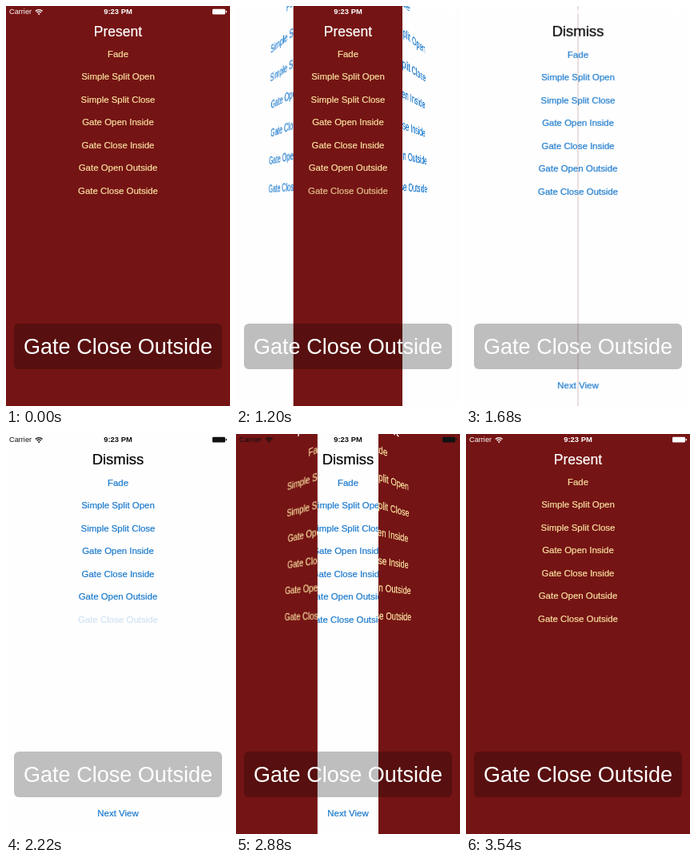
Animation, 280 px wide and 500 px high, one loop 3600 ms. Source, as an HTML page:

```html
<!DOCTYPE html>
<html lang="en">
<head>
<meta charset="utf-8">
<title>Gate transitions</title>
<style>
  html, body { margin: 0; width: 100%; height: 100%; overflow: hidden; }
  body { font: 11.45px/20px "Liberation Sans", Arial, sans-serif; }
  #stage { position: relative; width: 280px; height: 500px; overflow: hidden; }
  .page, .door { position: absolute; top: 0; left: 0; height: 500px; overflow: hidden; }
  .page { width: 280px; }
  .door { width: 140px; }
  .door.right { left: 140px; }
  .right .page { left: -140px; }
  .page div {
    position: absolute; left: 0; width: 100%; height: 20px; margin-top: -10px;
    text-align: center; white-space: nowrap; -webkit-text-stroke: .2px;
  }
  .red { background: #751414; color: #fbe3a2; }
  .white { background: #fefefe; color: #1878cc; }
  .page .title { top: 32px; }
  .red .title { font-size: 17.5px; color: #fff; }
  .white .title { font-size: 18.5px; color: #000; }
  #toast {
    position: absolute; left: 10px; top: 397px; width: 260px; height: 57px;
    border-radius: 6px; background: rgba(0, 0, 0, .25); color: #fff;
    font-size: 27.05px; line-height: 59px; text-align: center; white-space: nowrap;
  }
  #status { position: absolute; left: 0; top: 0; width: 280px; height: 15px; }
  #status text { font-size: 9.2px; fill: currentColor; }
</style>
</head>
<body>
<div id="stage">
  <div id="toast">Gate Close Outside</div>
  <svg id="status" viewBox="0 0 280 15">
    <text x="4" y="10.3">Carrier</text>
    <text x="140" y="10.3" text-anchor="middle" font-weight="bold" style="font-size:9.4px">9:23 PM</text>
    <g fill="none" stroke="currentColor" stroke-width="1.4">
      <path d="M36.9 6.4a6 6 0 0 1 8.6 0M38.6 8.2a3.6 3.6 0 0 1 5.2 0"/>
      <path d="M41.2 11.2l-1.4-1.5a2 2 0 0 1 2.8 0z" fill="currentColor" stroke="none"/>
    </g>
    <g fill="currentColor">
      <rect x="258" y="3.8" width="16" height="6.6" rx="1.2"/>
      <path d="M274.7 5.6a1.5 1.5 0 0 1 0 3z"/>
    </g>
  </svg>
</div>
<script>
const LOOP = 3600, STEP = 60, DEPTH = 373;
const OPTIONS = ['Fade', 'Simple Split Open', 'Simple Split Close', 'Gate Open Inside',
  'Gate Close Inside', 'Gate Open Outside', 'Gate Close Outside'];

// Each run closes doors showing the other page over the base page.
const RUNS = [
  { base: 'red', press: 720, release: 880, show: 880, start: 880, length: 930 },
  { base: 'white', press: 2160, release: 2370, show: 2500, start: 2380, length: 1120 }
];

const stage = document.getElementById('stage');
const toast = document.getElementById('toast');
const statusBar = document.getElementById('status');

function add(parent, cls, text, y) {
  const el = document.createElement('div');
  el.className = cls;
  if (text) {
    el.textContent = text;
    el.style.top = y + 'px';
  }
  parent.appendChild(el);
  return el;
}

function makePage(parent, theme) {
  const page = add(parent, 'page ' + theme);
  const top = theme === 'red' ? 59.8 : 60.8;
  add(page, 'title', theme === 'red' ? 'Present' : 'Dismiss', 32);
  const rows = OPTIONS.map((name, i) => add(page, 'option', name, top + 28.5 * i));
  if (theme === 'white') add(page, 'option', 'Next View', 474.3);
  return { page, last: rows[rows.length - 1] };
}

function makeDoor(side, theme) {
  const door = add(stage, 'door ' + side);
  door.style.transformOrigin = side + ' center';
  makePage(door, theme);
  return door;
}

const pages = { red: makePage(stage, 'red'), white: makePage(stage, 'white') };
for (const run of RUNS) {
  const theme = run.base === 'red' ? 'white' : 'red';
  run.doors = [makeDoor('left', theme), makeDoor('right', theme)];
}
stage.append(toast, statusBar);

// cubic-bezier(.42, 0, .58, 1)
function easeInOut(x) {
  let lo = 0, hi = 1, s = .5;
  for (let i = 0; i < 24; i++) {
    s = (lo + hi) / 2;
    const r = 1 - s;
    if (1.26 * s * r * r + 1.74 * s * s * r + s * s * s < x) lo = s; else hi = s;
  }
  return s * s * (3 - 2 * s);
}

function tapOpacity(run, t) {
  if (t < run.press) return 1;
  return .2 + .8 * Math.min(1, Math.max(0, (t - run.release) / 400));
}

// The perspective flattens out together with the angle.
function swing(run, t) {
  const x = (t - run.start) / run.length;
  const open = t >= run.show && x > 0 && x < 1;
  const left = open ? 1 - easeInOut(x) : 1;
  run.doors.forEach((door, i) => {
    door.style.visibility = open ? 'visible' : 'hidden';
    if (open) {
      const angle = (i ? 90 : -90) * left;
      door.style.transform = `perspective(${DEPTH / left}px) rotateY(${angle}deg)`;
    }
  });
}

function draw(now) {
  const t = Math.floor((now % LOOP) / STEP) * STEP;
  const ended = run => t >= run.start + run.length;
  const base = ended(RUNS[0]) && !ended(RUNS[1]) ? 'white' : 'red';
  for (const theme in pages) {
    pages[theme].page.style.visibility = theme === base ? 'visible' : 'hidden';
  }
  for (const run of RUNS) {
    pages[run.base].last.style.opacity = ended(run) ? 1 : tapOpacity(run, t);
    swing(run, t);
  }
  statusBar.style.color = base === 'red' ? '#fff' : '#111';
}

function tick() {
  draw(performance.now());
  requestAnimationFrame(tick);
}
tick();
</script>
</body>
</html>
```
